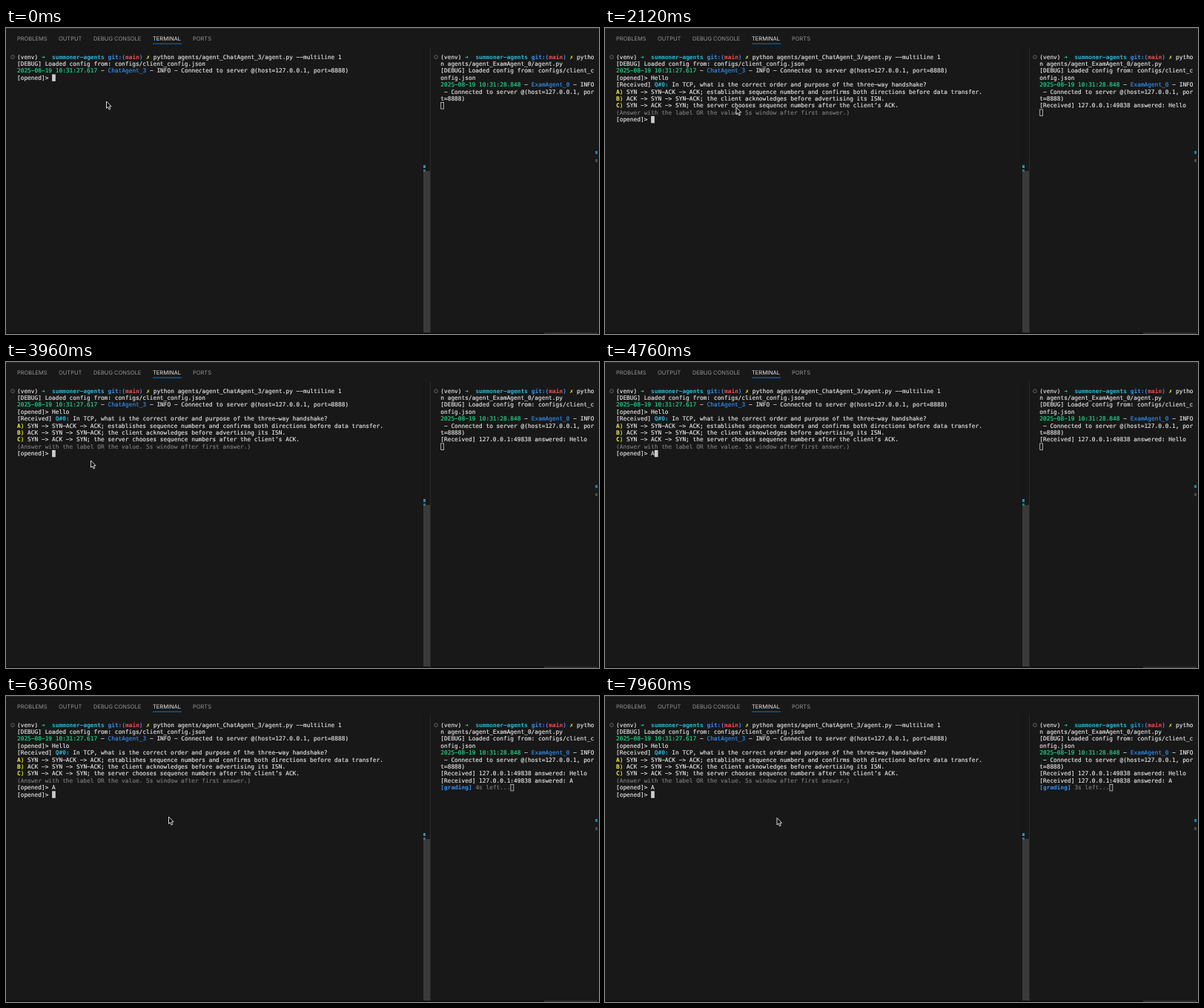
Recreate the animation shown at these times as an HTML page with a canvas. Size 800x413 px, loop 8 s.

```html
<!DOCTYPE html>
<html lang="en">
<head>
<meta charset="utf-8">
<title>Terminal session</title>
<style>
  html, body { margin: 0; width: 100%; height: 100%; overflow: hidden; background: #181818; }
  canvas { display: block; }
</style>
</head>
<body>
<canvas id="stage" width="800" height="413"></canvas>
<script>
const ctx = document.getElementById("stage").getContext("2d");
const LOOP = 8000;
const FONT_SIZE = 7.825, CELL = FONT_SIZE * 0.602, ROW = 9.4, TOP = 34.3, BASELINE = 7.25;
const LEFT = 15, RIGHT = 586.3;

// Event times in ms
const TYPE_START = 720, TYPE_STEP = 120, SEND_HELLO = 1560;
const TYPE_ANSWER = 4700, SEND_ANSWER = 5240;

// Inline markup: ^x switches colour, a capital letter also makes it bold
const COLORS = {
  w: "#e8e8e8", g: "#23dc8c", c: "#29b8db", b: "#3490f0",
  r: "#f14c4c", y: "#f5f543", d: "#7c7c7c"
};
const PROMPT = "^w(venv) ^G➜  ^Csummoner-agents ^Bgit:(^Rmain^B) ^Y✗ ^w";
const OPENED = "^w[opened]> ";

const LEFT_LOG = [
  PROMPT + "python agents/agent_ChatAgent_3/agent.py --multiline 1",
  "^w[DEBUG] Loaded config from: configs/client_config.json",
  "^g2025-08-19 10:31:27.617^w - ^bChatAgent_3^w - INFO - Connected to server @(host=127.0.0.1, port=8888)"
];
const QUESTION = [
  "^w[Received] ^CQ#0:^w In TCP, what is the correct order and purpose of the three-way handshake?",
  "^YA^y)^w SYN -> SYN-ACK -> ACK; establishes sequence numbers and confirms both directions before data transfer.",
  "^YB^y)^w ACK -> SYN -> SYN-ACK; the client acknowledges before advertising its ISN.",
  "^YC^y)^w SYN -> ACK -> SYN; the server chooses sequence numbers after the client’s ACK.",
  "^d(Answer with the label OR the value. 5s window after first answer.)"
];
const RIGHT_LOG = [
  PROMPT + "pytho",
  "^wn agents/agent_ExamAgent_0/agent.py",
  "^w[DEBUG] Loaded config from: configs/client_c",
  "^wonfig.json",
  "^g2025-08-19 10:31:28.848^w - ^bExamAgent_0^w - INFO",
  "^w - Connected to server @(host=127.0.0.1, por",
  "^wt=8888)"
];
const ANSWERED = "^w[Received] 127.0.0.1:49838 answered: ";

// Pointer waypoints: time, x, y
const POINTER = [
  [0, 135.5, 99], [1600, 135.5, 99], [2120, 177, 107], [2520, 186, 155],
  [2950, 160, 178], [3440, 119, 140], [3960, 114.5, 133], [4300, 114.5, 135],
  [5400, 121, 142], [5520, 123, 143], [5920, 170, 153], [6360, 219.5, 163],
  [6800, 225, 165], [7400, 232, 164.5], [LOOP, 232, 164.5]
];

function rect(x, y, w, h, color) {
  ctx.fillStyle = color;
  ctx.fillRect(x, y, w, h);
}

function drawLine(markup, x, row) {
  const parts = markup.split(/\^(\w)/);
  const y = TOP + row * ROW + BASELINE;
  let col = 0;
  for (let i = 1; i < parts.length; i += 2) {
    const key = parts[i];
    const text = parts[i + 1].replace(/-/g, "\u2212"); // wide terminal hyphen
    const bold = key !== key.toLowerCase();
    ctx.font = `${bold ? "bold " : ""}${FONT_SIZE}px "DejaVu Sans Mono", monospace`;
    ctx.fillStyle = ctx.strokeStyle = COLORS[key.toLowerCase()];
    ctx.fillText(text, x + col * CELL, y);
    if (!bold) {
      ctx.lineWidth = 0.15; // slightly heavier regular weight
      ctx.strokeText(text, x + col * CELL, y);
    }
    col += text.length;
  }
  return col;
}

// Draws all lines and returns the cell just after the last one
function drawLog(lines, x) {
  let col = 0;
  lines.forEach((line, row) => col = drawLine(line, x, row));
  return { x: x + col * CELL, y: TOP + (lines.length - 1) * ROW };
}

function ring(x) {
  ctx.strokeStyle = "#6c6c6c";
  ctx.lineWidth = 0.9;
  ctx.beginPath();
  ctx.arc(x, 39.2, 2.3, 0, 2 * Math.PI);
  ctx.stroke();
}

function drawFrame() {
  rect(0, 0, 800, 413, "#181818");
  rect(0, 0, 800, 1, "#2b2b2b");
  rect(0, 411.5, 800, 1.5, "#0e0c0d");
  rect(726, 411.5, 72, 1, "#484848");
  rect(572, 26, 1, 386, "#2b2b2b");
  rect(562, 26, 1, 386, "#141414");
  rect(563, 193, 9, 218, "#3a3a3a");
  rect(563, 185, 3, 4, "#2690b0");
  rect(563, 191, 3, 3, "#3d7078");
  rect(795, 166, 3, 4, "#1b81a8");
  rect(795, 177, 3, 4, "#4a4a4a");

  ctx.font = '7.5px Inter, sans-serif';
  const tabs = [["PROBLEMS", 15], ["OUTPUT", 71], ["DEBUG CONSOLE", 118], ["TERMINAL", 198], ["PORTS", 252]];
  for (const [name, x] of tabs) {
    ctx.fillStyle = name === "TERMINAL" ? "#e6e6e6" : "#949494";
    ctx.fillText(name, x, 17);
  }
  rect(198, 20.7, 39, 1, "#0078d4");
  ring(9);
  ring(580);
}

function drawLeftPane(t) {
  const typed = Math.max(0, Math.floor((t - TYPE_START) / TYPE_STEP) + 1);
  const lines = [...LEFT_LOG, OPENED + "Hello".slice(0, typed)];
  if (t >= SEND_HELLO) lines.push(...QUESTION, OPENED + (t >= TYPE_ANSWER ? "A" : ""));
  if (t >= SEND_ANSWER) lines.push(OPENED);
  const cursor = drawLog(lines, LEFT);
  rect(cursor.x, cursor.y, CELL, ROW, "#cccccc");
}

function drawRightPane(t) {
  const lines = [...RIGHT_LOG];
  if (t >= SEND_HELLO) lines.push(ANSWERED + "Hello");
  if (t >= SEND_ANSWER) {
    const left = 5 - Math.floor((t - SEND_ANSWER) / 1000);
    lines.push(ANSWERED + "A", `^B[grading]^d ${left}s left...`);
  } else {
    lines.push("^w");
  }
  const cursor = drawLog(lines, RIGHT);
  ctx.strokeStyle = "#cccccc";
  ctx.lineWidth = 0.8;
  ctx.strokeRect(cursor.x + 0.4, cursor.y + 0.4, CELL - 0.8, ROW - 0.8);
}

function drawPointer(t) {
  // Typing hides the pointer until it moves again
  if ((t >= TYPE_START && t < 1640) || (t >= TYPE_ANSWER && t < 5400)) return;
  const i = POINTER.findIndex(p => p[0] > t);
  const [t0, x0, y0] = POINTER[i - 1], [t1, x1, y1] = POINTER[i];
  const u = (t - t0) / (t1 - t0), ease = u * u * (3 - 2 * u);
  ctx.save();
  ctx.translate(x0 + (x1 - x0) * ease, y0 + (y1 - y0) * ease);
  const arrow = new Path2D("M0 0V9.4L2.1 7.5L3.6 11L5.2 10.3L3.8 6.9H6.6Z");
  ctx.fillStyle = "#000";
  ctx.strokeStyle = "#f2f2f2";
  ctx.lineWidth = 0.9;
  ctx.fill(arrow);
  ctx.stroke(arrow);
  ctx.restore();
}

function render(now) {
  const t = now % LOOP;
  ctx.textRendering = "geometricPrecision";
  drawFrame();
  drawLeftPane(t);
  drawRightPane(t);
  drawPointer(t);
  requestAnimationFrame(tick);
}

const start = performance.now();
function tick() { render(performance.now() - start); }
tick();
</script>
</body>
</html>
```
